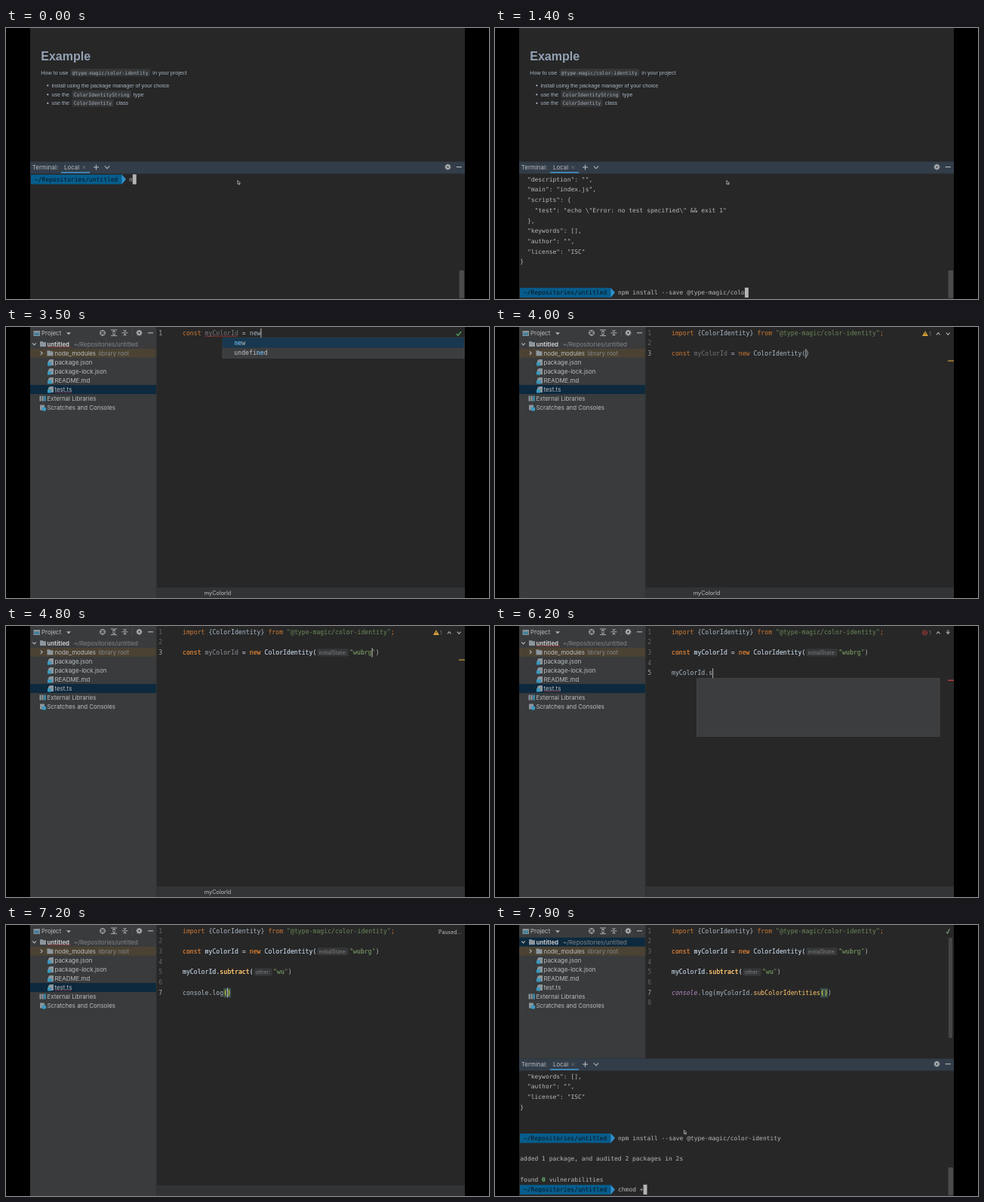
An HTML page with a canvas for the animation above (8000 ms loop, 640 by 360 pixels).

```html
<!DOCTYPE html>
<html lang="en">
<head>
<meta charset="utf-8">
<title>Typed package demo</title>
<style>
  html, body { margin: 0; width: 100%; height: 100%; overflow: hidden; background: #000; }
  canvas { display: block; width: 640px; height: 360px; }
</style>
</head>
<body>
<canvas id="stage" width="640" height="360"></canvas>
<script>
const ctx = document.getElementById('stage').getContext('2d');
const LOOP = 8000, STEP = 100;
const LEFT = 32, RIGHT = 608, PANEL = 199.5;
const MONO = '"DejaVu Sans Mono", monospace';
const UI = 'Inter, sans-serif';
const ARIAL = '"Liberation Sans", sans-serif';
const CODE = `8.19px ${MONO}`, SHELL = `7.97px ${MONO}`, LABEL = `7.9px ${UI}`;
const CHAR = 4.93, CELL = 4.8, LINE = 13.65;
const C = {
  editor: '#272727', panel: '#393b3d', text: '#a9b7c6', ui: '#bbbcbd', dim: '#77797b',
  key: '#cc7832', str: '#6a8759', fn: '#ffc66d', blue: '#4a9ede', red: '#bc3f3c', icon: '#adb0b2'
};

const clamp = (v, lo, hi) => Math.max(lo, Math.min(hi, v));
const typed = (s, t, start, perStep) =>
  s.slice(0, clamp(Math.round((t - start) / STEP * perStep), 0, s.length));

function rect(x, y, w, h, color, radius = 0) {
  ctx.fillStyle = color;
  ctx.beginPath();
  ctx.roundRect(x, y, w, h, radius);
  ctx.fill();
}

function text(s, x, middle, color = C.ui, font = LABEL) {
  ctx.font = font;
  ctx.fillStyle = color;
  ctx.fillText(s, x, middle + 2.8);
  return x + ctx.measureText(s).width;
}

function path(points, color = C.icon, width = 1, fill = false) {
  ctx.beginPath();
  points.forEach(([x, y], i) => i ? ctx.lineTo(x, y) : ctx.moveTo(x, y));
  ctx.lineWidth = width;
  ctx.strokeStyle = ctx.fillStyle = color;
  fill ? ctx.fill() : ctx.stroke();
}

function circle(x, y, r, color, width = 0) {
  ctx.beginPath();
  ctx.arc(x, y, r, 0, Math.PI * 2);
  ctx.lineWidth = width;
  ctx.strokeStyle = ctx.fillStyle = color;
  width ? ctx.stroke() : ctx.fill();
}

const chevron = (x, y, w, h, color) => path([[x - w, y - h], [x, y + h], [x + w, y - h]], color, 1.1);

function wave(x, y, width) {
  const points = [];
  for (let i = 0; i <= width; i += 1.5) points.push([x + i, y + (i / 1.5 % 2 ? 0.6 : -0.6)]);
  path(points, C.red, 0.7);
}

function gear(x, y) {
  for (let i = 0; i < 8; i++) {
    const a = i * Math.PI / 4;
    path([[x, y], [x + 4 * Math.cos(a), y + 4 * Math.sin(a)]], C.icon, 1.4);
  }
  circle(x, y, 3, C.icon);
  circle(x, y, 1.2, C.panel);
}

const minus = (x, y) => path([[x - 3.5, y], [x + 3.5, y]], C.icon, 1.2);

function pointer(x, y) {
  const arrow = [[x, y], [x, y + 5], [x + 1.2, y + 4], [x + 2, y + 5.6], [x + 2.8, y + 5.2],
    [x + 2, y + 3.6], [x + 3.5, y + 3.5], [x, y]];
  path(arrow, '#111', 1, true);
  path(arrow, '#ddd', 0.7);
}

function preview(x) {
  const body = `7.2px ${ARIAL}`, color = '#a6b3c2';
  const chip = (s, cx, y) => {
    rect(cx, y - 5, s.length * 3.88 + 5, 10, '#363738', 2);
    text(s, cx + 2.5, y, color, `6.45px ${MONO}`);
  };
  ctx.font = `bold 16px ${ARIAL}`;
  ctx.fillStyle = '#94a3b5';
  ctx.fillText('Example', x, 42.8);
  text('How to use', x, 59.2, color, body);
  chip('@type-magic/color-identity', x + 39, 59.3);
  text('in your project', x + 148, 59.2, color, body);
  [76, 88, 99.5].forEach(y => circle(x + 9, y + 0.4, 1.1, color));
  text('install using the package manager of your choice', x + 14.2, 76, color, body);
  text('use the', x + 14.2, 88, color, body);
  chip('ColorIdentityString', x + 41, 88);
  text('type', x + 122.5, 88, color, body);
  text('use the', x + 14.2, 99.5, color, body);
  chip('ColorIdentity', x + 41, 99.5);
  text('class', x + 99.5, 99.5, color, body);
}

function fileIcon(x, y, tag) {
  path([[x + 2, y - 4], [x + 7, y - 4], [x + 7, y + 4], [x, y + 4], [x, y - 2]], '#8b959c', 1, true);
  rect(x - 1, y, tag === 'md' ? 6 : 5, 4.5, '#3c99bd');
}

function folder(x, y) {
  rect(x, y - 3.5, 4, 2, '#8c969d');
  rect(x, y - 2.5, 8, 6, '#8c969d');
}

function project(t) {
  const hasFile = t >= 2500;
  const selected = t < 2500 || t >= 7700 ? 22.7 : 83;
  rect(LEFT, 0, PANEL - LEFT, 360, C.panel);
  rect(LEFT, selected - 6, PANEL - LEFT, 12, '#0d293e');
  rect(LEFT, 28.8, PANEL - LEFT, 12, '#4b4233');
  rect(PANEL - 0.7, 0, 0.7, 360, '#303234');

  rect(36.5, 5, 8.5, 7, '#899197');
  rect(37.5, 7.5, 6.5, 3.5, '#3f7f9b');
  text('Project', 47, 8.5);
  path([[80, 7.2], [86, 7.2], [83, 10.4]], C.icon, 1, true);
  circle(128, 7.8, 3.4, C.icon, 1);
  path([[124, 7.8], [127, 7.8]]); path([[129, 7.8], [132, 7.8]]);
  path([[128, 4], [128, 6.8]]); path([[128, 8.8], [128, 12]]);
  [143, 157.5].forEach((x, i) => {
    if (i) path([[x - 4, 7.8], [x + 4, 7.8]]);
    else { path([[x - 4, 4], [x + 4, 4]]); path([[x - 4, 11.6], [x + 4, 11.6]]); }
    chevron(x, i ? 5 : 9.5, 1.8, i ? 1 : 0.8);
    chevron(x, i ? 10.5 : 6.2, 1.8, i ? -1 : -0.8);
  });
  rect(167, 3, 0.7, 10, '#515456');
  gear(176.5, 7.8);
  minus(191.5, 7.8);

  chevron(37.5, 22.7, 2.3, 1.2);
  folder(45, 22.7);
  text('untitled', 54.5, 22.7, '#c7c8c9', `bold 7.9px ${UI}`);
  text('~/Repositories/untitled', 90, 22.7, '#85888a');
  path([[45.8, 32.5], [48.2, 34.8], [45.8, 37.1]], C.icon, 1.1);
  folder(54.5, 34.8);
  text('node_modules', 64.5, 34.8);
  text('library root', 122.5, 34.8, '#85888a');
  const files = ['package.json', 'package-lock.json', 'README.md'];
  if (hasFile) files.push('test.ts');
  files.forEach((name, i) => {
    const y = 47 + i * 12;
    fileIcon(56, y, name.endsWith('md') ? 'md' : '');
    text(name, 64.5, y);
  });
  const y = 47 + files.length * 12;
  [0, 3, 6].forEach((x, i) => rect(44.5 + x, y - 3.5, 2.2, 7, i === 2 ? '#3c99bd' : '#8c969d'));
  text('External Libraries', 54.5, y);
  rect(45, y + 8.5, 6, 7, '#8c969d');
  circle(50.5, y + 14, 2.8, '#3c99bd');
  text('Scratches and Consoles', 54.5, y + 12);
  if ((t >= 2900 && t < 3900) || (t >= 5600 && t < 7500)) {
    wave(54.5, 26.7, 32);
    wave(64.5, 87, 23);
  }
}

const INIT = 'npm init -y', INSTALL = 'npm install --save @type-magic/color-identity';
const MANIFEST = `Wrote to /Users/dev/Repositories/untitled/package.json:

{
  "name": "untitled",
  "version": "1.0.0",
  "description": "",
  "main": "index.js",
  "scripts": {
    "test": "echo \\"Error: no test specified\\" && exit 1"
  },
  "keywords": [],
  "author": "",
  "license": "ISC"
}

`.split('\n');
const REPORT = ['', 'added 1 package, and audited 2 packages in 2s', '', 'found 0 vulnerabilities'];

function shellLines(t) {
  const lines = [{ cmd: t === 0 ? 'n' : typed(INIT, t, -30, 3) }];
  if (t >= 500 && t < 600) lines.push('');
  if (t >= 600) {
    lines.push(...MANIFEST, { cmd: typed(INSTALL, t, 700, 5) });
    if (t >= 1700) lines.push(...(t >= 1800 ? REPORT : ['']));
    if (t >= 1800) lines.push({ cmd: typed('chmod +', t, 7600, 2.4) });
  }
  return lines;
}

function terminal(t) {
  rect(LEFT, 177.5, RIGHT - LEFT, 182.5, C.editor);
  rect(LEFT, 177.5, RIGHT - LEFT, 16, '#323d49');
  text('Terminal:', 34.8, 185.3);
  text('Local', 77, 185.3);
  rect(73, 191, 38, 2, '#4083b5');
  path([[101.3, 183.2], [105.3, 187.2]], C.dim, 0.8);
  path([[105.3, 183.2], [101.3, 187.2]], C.dim, 0.8);
  path([[116, 185], [123, 185]], C.icon, 1.2);
  path([[119.5, 181.5], [119.5, 188.5]], C.icon, 1.2);
  chevron(134, 185, 3.2, 1.6);
  gear(585.5, 184.6);
  minus(600.3, 184.6);

  const lines = shellLines(t).slice(-12);
  lines.forEach((line, i) => {
    const y = 201 + i * 13.68;
    if (typeof line === 'string') {
      text(line, 33.3, y, '#b6b8ba', SHELL);
      if (line.startsWith('found')) text('0', 33.3 + 6 * CELL, y, '#4fa34f', `bold ${SHELL}`);
      return;
    }
    rect(33, y - 6.2, 121, 12.6, '#075d8d');
    path([[153.5, y - 6.2], [159, y], [153.5, y + 6.4]], '#3290c9', 1, true);
    text('~/Repositories/untitled', 38, y, '#0b1218', SHELL);
    text(line.cmd, 163, y, '#b6b8ba', SHELL);
    if (i === lines.length - 1) rect(163 + line.cmd.length * CELL, y - 6.6, 4.9, 13.2, '#b5b5b5');
  });
  rect(600.5, 322, 6.5, 37, '#4b4b4b', 1);
}

// Draws [text, colour, style] spans; style "hint" is an inlay label, "match" a highlighted brace.
function codeLine(row, spans, caret = false) {
  const y = 8 + (row - 1) * LINE;
  let x = 234;
  spans.forEach(([s, color = C.text, style = '']) => {
    if (style === 'hint') {
      ctx.font = `7.2px ${UI}`;
      const w = ctx.measureText(s).width;
      rect(x + 1, y - 5, w + 4, 10, '#343637', 2);
      x = text(s, x + 3, y, '#7c7f81', `7.2px ${UI}`) + 3.5;
      return;
    }
    const width = s.length * CHAR;
    if (style === 'match') rect(x, y - 6, width, 12.5, '#3b514d');
    text(s, x, y, color, style === 'italic' ? `italic ${CODE}` : CODE);
    if (style === 'error') wave(x, y + 4.3, width);
    if (s === '\u200b') x -= CHAR;
    x += width;
  });
  if (caret) rect(x, y - 6.3, 0.9, 12.6, '#c8c8c8');
  return x;
}

function caretAt(x, row) {
  rect(x, 8 + (row - 1) * LINE - 6.3, 0.9, 12.6, '#c8c8c8');
}

function popup(x, y, w, h, items, match) {
  rect(x, y, w, h, '#3b3d3f');
  ctx.strokeStyle = '#4b4d4f';
  ctx.lineWidth = 0.7;
  ctx.strokeRect(x, y, w, h);
  if (items.length) rect(x, y, w, 13.2, '#17384f');
  items.forEach((item, i) => {
    const ty = y + 6.6 + i * 13;
    const at = item.toLowerCase().indexOf(match.toLowerCase());
    text(item, x + 15.3, ty, '#c0c3c5', CODE);
    if (at >= 0) text(item.slice(at, at + match.length), x + 15.3 + at * CHAR, ty, C.blue, CODE);
  });
}

function inspection(t) {
  if (t < 3800) path([[596.8, 9], [599, 11.2], [603, 6.3]], '#499c54', 1.6);
  else if (t < 6900) {
    const error = t >= 5600;
    if (error) {
      circle(569.5, 9, 3, C.red, 1);
      path([[567.8, 9], [571.2, 9]], C.red);
      rect(600, 71.5, 8, 1.4, C.red);
    } else {
      path([[566, 12], [570, 5.2], [574, 12]], '#d7a13b', 1, true);
      rect(569.6, 7.4, 0.9, 2.6, '#40351c');
      rect(600, 44.3, 8, 1.4, '#b98b39');
    }
    text('1', 575, 9, C.dim, `7px ${UI}`);
    chevron(587.3, 9, 2.3, -1.3);
    chevron(600.2, 9, 2.3, 1.3);
    if (error) path([[600.2, 5], [600.2, 10]]);
  } else if (t < 7600) text('Paused...', 573, 9.3, C.ui, `7px ${UI}`);
  else path([[598, 9], [599.5, 11], [602.5, 5]], '#6f9b76', 1.2);
}

function declaration(t, row) {
  const spans = [['const ', C.key]];
  if (row === 1) {
    const source = 'const myColorId = new Color';
    const s = t <= 3500 ? typed(source, t, 2800, 3) : typed(source, t, 2800, 3);
    const part = (a, b) => s.slice(a, b);
    const end = codeLine(1, [[part(0, 6), C.key], [part(6, 15), t < 3300 ? C.text : '#72737a', s.length > 15 ? 'error' : ''],
      [part(15, 18)], [part(18, 21), s.length === 21 ? C.text : C.key], [part(21)]]);
    caretAt(end, 1);
    if (t >= 3400 && t < 3600) popup(287, 14.2, 320, 27, ['new', 'undefined'], 'ne');
    if (t >= 3600) popup(327, 14.2, 280, 66,
      ['ColorIdentity', 'ColorIdentityString', 'ColorIdentityInput', 'ColorIdentities', 'ColorDepth'], s.slice(22));
    return;
  }
  spans.push(['myColorId', t < 5900 ? '#72737a' : C.text], [' = '], ['new ', C.key], ['ColorIdentity']);
  if (t >= 3900) {
    spans.push(['(']);
    if (t >= 4300) {
      const count = t < 4700 ? (t - 4300) / STEP : t < 4800 ? 3 : 5;
      spans.push(['initialState:', C.dim, 'hint'], [`"${'wubrg'.slice(0, count)}`, C.str]);
      const x = codeLine(row, spans);
      spans.push(['"', C.str]);
      if (t < 5000) caretAt(x, row);
    }
    spans.push([')']);
  }
  const end = codeLine(row, spans);
  if (t < 4300) caretAt(end - (t >= 3900 ? CHAR : 0), row);
  else if (t >= 5000 && t < 5400) caretAt(end, row);
}

function subtraction(t) {
  if (t < 6300) {
    const s = typed('myColorId.s', t, 5650, 2);
    const end = codeLine(5, [[s]], true);
    if (t >= 6100) popup(267.5, 69.7, 321.5, 77, [], '');
    else if (s.length > 1) popup(219, 69.7, 320, 27, ['myColorId'], s);
    return end;
  }
  if (t < 6400) {
    codeLine(5, [['myColorId.su']], true);
    popup(267.5, 69.7, 321.5, 77, ['subtract', 'subColorIdentities', 'isSubsetOf', 'isSupersetOf', 'toString'], 'su');
    return;
  }
  const spans = [['myColorId.'], ['subtract', C.fn], ['(']];
  if (t >= 6500) {
    spans.push(['other:', C.dim, 'hint'], [`"${typed('wu', t, 6500, 1)}`, C.str]);
    const x = codeLine(5, spans);
    if (t < 6800) caretAt(x, 5);
    spans.push(['"', C.str]);
  }
  spans.push([')']);
  codeLine(5, spans);
}

function logging(t) {
  if (t < 7200) {
    const s = typed('console.log', t, 6800, 3.7);
    codeLine(7, [[s]], true);
    if (t >= 6900) popup(219, 97, 320, 40, ['console', 'constants', 'Console'], s);
    return;
  }
  const done = t >= 7600;
  const spans = [done ? ['console', '#b389c5', 'italic'] : ['console'], ['.log']];
  if (t < 7300) {
    const x = codeLine(7, [...spans, ['(', '#ffef28', 'match'], [')', '#ffef28', 'match']]);
    caretAt(x - CHAR, 7);
    return;
  }
  spans.push(['(']);
  if (t < 7500) {
    const s = typed('myColorId.sub', t, 7200, 6.5);
    const x = codeLine(7, [...spans, [s], [')']]);
    caretAt(x - CHAR, 7);
    if (t >= 7400) popup(322, 97, 267, 27, ['subColorIdentities', 'subtract'], 'sub');
    return;
  }
  const x = codeLine(7, [...spans, ['myColorId.'], ['subColorIdentities', C.fn],
    ['(', '#ffef28', 'match'], [')', '#ffef28', 'match'], [')']]);
  if (t < 7700) caretAt(x - CHAR, 7);
}

function editor(t) {
  const imported = t >= 3800;
  const rows = !imported ? 1 : t < 5400 ? 3 : t < 5500 ? 4 : t < 6800 ? 5 : t < 7600 ? 7 : 8;
  const current = t >= 7600 ? 7 : rows;
  for (let i = 1; i <= rows; i++)
    text(String(i), 202.3, 8 + (i - 1) * LINE, i === current ? '#a4a3a3' : '#606366', CODE);
  if (t < 7700) {
    rect(PANEL, 346, RIGHT - PANEL, 14, '#313335');
    if (t >= 3100 && t < 5400) text('myColorId', 262.8, 353.6, C.ui, `7.3px ${UI}`);
  }
  if (imported) {
    codeLine(1, [['import ', C.key], ['{ColorIdentity} '], ['from ', C.key],
      ['"@type-magic/color-identity"', C.str], [';', C.key]]);
    declaration(t, 3);
  } else if (t >= 2900) declaration(t, 1);
  else caretAt(234, 1);
  inspection(t);
  if (t >= 5500) subtraction(t);
  if (t >= 6800) logging(t);
  if (t >= 7700) rect(601, 17, 5, 133, '#454545');
}

function newFileDialog(t) {
  rect(216, 171, 208, 33, '#1f1f1f');
  rect(217.3, 171.5, 205.5, 31, '#3a3c3e');
  rect(217.3, 171.5, 205.5, 14.5, '#42464a');
  rect(217.3, 186, 205.5, 0.8, '#4d6577');
  text('New File', 304.8, 178.8);
  const name = t < 2200 ? '' : t < 2300 ? 't' : t < 2400 ? 'test' : 'test.ts';
  const end = text(name, 221, 195);
  rect(end + 0.2, 190, 0.8, 9.5, '#bbb');
}

function draw(t) {
  ctx.fillStyle = '#000';
  ctx.fillRect(0, 0, 640, 360);
  ctx.save();
  ctx.beginPath();
  ctx.rect(LEFT, 0, RIGHT - LEFT, 360);
  ctx.clip();
  rect(LEFT, 0, RIGHT - LEFT, 360, C.editor);
  if (t < 2500) preview(t < 2000 ? 46.3 : 213.8);
  else editor(t);
  if (t >= 2000) project(t);
  if (t >= 2000 && t < 2500) [5, 8, 11].forEach(y => circle(600.3, y, 0.9, C.icon));
  if (t >= 2100 && t < 2500) newFileDialog(t);
  if (t < 1900 || t >= 7700) {
    terminal(t);
    if (t < 1900) pointer(307, 202.5);
    else pointer(250.5, 272.5);
  }
  ctx.restore();
}

function frame(now) {
  draw(Math.floor(now % LOOP / STEP) * STEP);
  requestAnimationFrame(frame);
}
draw(0);
requestAnimationFrame(frame);
</script>
</body>
</html>
```
